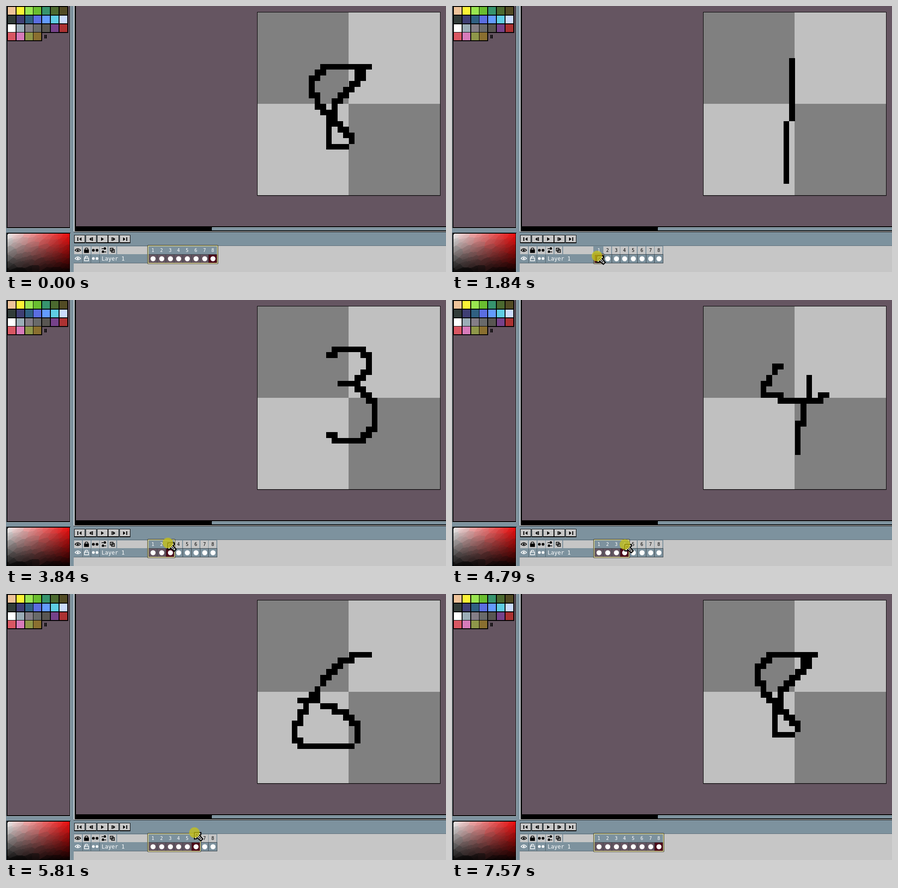
These frames come from a looping animation (962 by 582 pixels, 8 s). An HTML page with a canvas:

```html
<!DOCTYPE html>
<html lang="en">
<head>
<meta charset="utf-8">
<title>Pixel editor timeline</title>
<style>
  html, body { margin: 0; width: 100%; height: 100%; overflow: hidden; background: #7d929e; }
  svg { position: absolute; left: 0; top: 0; display: block; }
  #picker { position: absolute; left: 3px; top: 498px; }
  text { font-family: "DejaVu Sans Mono", monospace; white-space: pre; }
  .num { font-size: 10px; text-anchor: middle; }
</style>
</head>
<body>
<svg id="stage" width="962" height="582" viewBox="0 0 962 582"></svg>
<canvas id="picker" width="136" height="84"></canvas>
<script>
const NS = 'http://www.w3.org/2000/svg';
const stage = document.getElementById('stage');
const STEEL = '#7d929e', PLUM = '#655561', GRAY = '#c6c6c6', INK = '#000', WHITE = '#fff';
const LOOP = 8000, COL = 18.75, LEFT = 312;

function add(tag, attrs, parent = stage) {
  const el = document.createElementNS(NS, tag);
  for (const k in attrs) el.setAttribute(k, attrs[k]);
  return parent.appendChild(el);
}
const box = (x, y, width, height, fill, parent) =>
  add('rect', { x, y, width, height, fill, 'shape-rendering': 'crispEdges' }, parent);
const path = (d, attrs, parent) => add('path', { d, ...attrs }, parent);
const label = (x, y, str, attrs) => {
  const el = add('text', { x, y, ...attrs });
  el.textContent = str;
  return el;
};

// Palette panel
function drawPalette() {
  box(0, 0, 1, 486, '#b4c4cc');
  box(1, 0, 139, 486, INK);
  box(2, 486, 138, 1, '#b4c4cc');
  box(140, 0, 1, 486, '#b4c4cc');
  box(3, 0, 136, 484, PLUM);
  const rows = [
    'eec39a fbf236 99e550 6abe30 37946e 4b692f 524b24',
    '323c39 3f3f74 306082 5b6ee1 639bff 5fcde4 cbdbfc',
    'ffffff 9badb7 847e87 696a6a 595652 76428a ac3232',
    'd95763 d77bba 8f974a 8a6f30'
  ];
  box(3, 0, 132, 2, INK);
  rows.forEach((row, j) => row.split(' ').forEach((c, i) => {
    const x = Math.round(3 + i * COL), y = Math.round(1 + j * COL);
    box(x, y, 20, 20, INK);
    box(x + 1, y + 1, 17, 17, '#' + c);
  }));
  box(84, 63, 2, 8, INK);
  box(87, 63, 2, 8, INK);
  box(1, 496, 140, 86, INK);
  box(140, 497, 1, 85, '#b4c4cc');
}

// Saturation/value field broken into slanted patches
function drawPicker() {
  const W = 136, H = 84, ctx = document.getElementById('picker').getContext('2d');
  const img = ctx.createImageData(W, H), seeds = [];
  let s = 7;
  const rnd = () => (s = (s * 16807) % 2147483647) / 2147483647;
  for (let k = 0; k < 190; k++) seeds.push([rnd() * 150 - 7, rnd() * 96 - 6]);
  for (let y = 0; y < H; y++) for (let x = 0; x < W; x++) {
    let best = 1e9, hit;
    for (const p of seeds) {
      const dx = x - p[0], dy = y - p[1];
      const along = (dx - dy * .6) * .55, across = dx * .6 + dy;
      const d = along * along + across * across;
      if (d < best) { best = d; hit = p; }
    }
    const u = Math.min(1, Math.max(0, (hit[0] * .6 + x * .4) / W));
    const v = Math.min(1, Math.max(0, 1 - (hit[1] * .6 + y * .4) / 86));
    const hi = 238 * v, lo = hi * (1 - u * .96);
    img.data.set([hi, lo, lo, 255], (y * W + x) * 4);
  }
  ctx.putImageData(img, 0, 0);
  ctx.fillStyle = INK;
  ctx.fillRect(0, 0, 2, 1);
  ctx.fillRect(0, 0, 1, 2);
}

// Drawing area with checkerboard
function drawEditor() {
  box(148, 0, 2, 495, '#dfe6ea');
  box(150, 0, 812, 494, INK);
  box(153, 0, 809, 482, PLUM);
  box(450, 484, 512, 7, STEEL);
  box(451, 484, 511, 1, '#a9bac4');
  box(150, 493, 812, 1, WHITE);
  box(148, 494, 814, 1, INK);
  box(549, 13, 401, 402, INK);
  box(549, 415, 401, 1, '#4a3f47');
  box(550, 14, 399, 400, '#c0c0c0');
  box(550, 14, 199, 200, '#808080');
  box(749, 214, 200, 200, '#808080');
}

function drawTransport() {
  const icons = ['M-5-4h2v8h-2zM4-4v8l-5-4z', 'M1-4v8l-5-4zM2-4h2v8h-2z', 'M-3-4v8l6-4z',
    'M-4-4h2v8h-2zM-1-4v8l5-4z', 'M-4-4v8l5-4zM3-4h2v8h-2z'];
  icons.forEach((d, i) => {
    const x = Math.round(149 + i * 24.8);
    box(x, 501, 24, 18, INK);
    box(x + 1, 502, 22, 15, GRAY);
    box(x + 1, 502, 22, 1, WHITE);
    path(d, { transform: `translate(${x + 12} 510)`, fill: INK });
  });
}

function rowIcons(y, color) {
  const at = x => add('g', { transform: `translate(${x} ${y})`, fill: 'none', stroke: color, 'stroke-width': 1.5 });
  const eye = at(157);
  path('M-6 0Q0-7 6 0Q0 6-6 0z', {}, eye);
  add('circle', { r: 2, fill: color, stroke: 'none' }, eye);
  const lock = at(176);
  path(color === INK ? 'M-3 0v-3q0-2 3-2t3 2v3' : 'M-3 0v-3q0-2 3-2t3 2', {}, lock);
  path('M-4.5-1h9v6h-9z', color === INK ? { fill: color } : {}, lock);
  const dots = at(195);
  for (const x of [-4, 4]) add('circle', { cx: x, r: 3, fill: color, stroke: 'none' }, dots);
}

function drawLayers() {
  box(148, 524, 163, 39, STEEL);
  box(311, 524, 651, 58, GRAY);
  box(148, 563, 814, 19, GRAY);
  box(148, 524, 814, 1, '#5f707a');
  for (let i = 0; i < 5; i++) box(Math.round(149 + i * COL), 526, 17, 17, GRAY);
  box(243, 526, 66, 17, GRAY);
  rowIcons(534.5, INK);
  rowIcons(552.5, WHITE);
  path('M209 531h10M209 538h10', { stroke: INK, 'stroke-width': 1.5 });
  path('M214 528h4v5h-4zM210 535h4v5h-4z', { fill: INK });
  path('M228 530h6v6h-6zM231 533h6v6h-6z', { fill: GRAY, stroke: INK, 'stroke-width': 1.5 });
  for (const x of [167, 185, 204]) box(x, 544, 1, 18, '#56656e');
  box(148, 562, 314, 1, '#56656e');
  label(209, 557, 'Layer 1', { fill: WHITE, 'font-size': 12 });
}

drawPalette();
drawPicker();
drawEditor();
drawTransport();
drawLayers();

// Hand-drawn numerals on a 32 x 32 grid; each cell is 12.5 px
const numerals = [
  'M15 8v10M14 19v10',
  'M11 13v-3h1v-1h1v-1h5v1h1v4h-1v2h-1v2h-1v2h-1v2h-1v2h-1v2h-1v1h13',
  'M12 8h1v-1h5v1h1v3h-1v1h-1v1h-3M17 14h1v1h1v1h1v5h-1v1h-1v1h-5v-1h-1',
  'M13 10h-1v1M11 12v1h-1v2h3v1h7v-1h1M18 12v4M17 17v3h-1v5',
  'M21 8h-9v8h5v1h2v1h1v6h-1v1h-1v1h-6v-1h-1',
  'M19 9h-3v1h-2v1h-1v1h-1v1h-1v1M10 15v2h-3M9 16h1M8 17v2h-1v2h-1v3h1v1h9M11 18h2v1h2v1h1v1h1v3',
  'M11 9h9v2h-1v2h-1v2h-1v3h-1v2M15 21v3h-1v4h-1v1',
  'M11 9h8M11 10h-1v1h-1v3h1v2h1v1h2M12 17v6h3M17 10h1v1h-1v1h-1v1h-1v1h-1v1h-1v4h1v1h1v1h1v1'
];
const sketch = path('', {
  transform: 'translate(549.5 14) scale(12.5) translate(.5 .5)', fill: 'none', stroke: INK,
  'stroke-width': 1, 'stroke-linecap': 'square', 'shape-rendering': 'crispEdges'
});

const columns = numerals.map((_, i) => {
  const x = Math.round(LEFT + i * COL);
  box(x - 1, 525, 20, 19, STEEL);
  box(x - 1, 543, 20, 20, '#3c474e');
  const head = box(x, 526, 17, 17, GRAY);
  const cell = box(x, 544, 18, 18, STEEL);
  const num = label(x + 9, 538, i + 1, { class: 'num' });
  add('circle', { cx: x + 9.5, cy: 553, r: 5.5, fill: WHITE });
  return { head, cell, num };
});

const outer = add('rect', { fill: 'none', stroke: '#2c2a22', rx: 1 });
const inner = add('rect', { fill: 'none', stroke: '#e2db8e', 'stroke-width': 1.6, rx: 1 });
const pointer = add('g', {});
path('M0 0H14V4L11 6L18 14L14 18L6 11L4 14H0z',
  { fill: WHITE, stroke: INK, 'stroke-width': 2.4, 'stroke-linejoin': 'miter' }, pointer);
path('M3.5 10V3.5H10M5 5L14 14', { fill: 'none', stroke: INK, 'stroke-width': 1.6 }, pointer);
const halo = add('circle', { r: 11.5, fill: '#c8c314', 'fill-opacity': .75 }, pointer);

// time, x, y of the pointer tip
const track = [
  [1200, 352, 578], [1700, 317, 547], [2080, 317, 547], [2240, 320, 534],
  [2450, 320, 534], [2600, 316, 531], [2770, 320, 534], [3230, 320, 534],
  [3970, 361, 531], [4300, 361, 531], [4790, 378, 535], [5110, 394, 532],
  [5810, 412, 522], [5940, 416, 523], [6470, 430, 529], [6680, 431, 530],
  [7300, 445, 531], [7450, 445, 531], [7490, 428, 350], [7530, 402, 168], [7570, 402, 168]
];
const CLICK = 1800, CLICK_END = 1920, PRESS = 2990, RELEASE = 7450;

function tipAt(t) {
  const i = track.findIndex(k => k[0] > t);
  if (i < 1) return null;
  const a = track[i - 1], b = track[i], f = (t - a[0]) / (b[0] - a[0]);
  return [a[1] + (b[1] - a[1]) * f, a[2] + (b[2] - a[2]) * f];
}

function setRect(el, x, y, w, h) {
  el.setAttribute('x', x);
  el.setAttribute('y', y);
  el.setAttribute('width', w);
  el.setAttribute('height', h);
}

function render(t) {
  const tip = tipAt(t);
  let cur = 7;
  if (t >= CLICK && t < PRESS) cur = 0;
  else if (t >= PRESS && t < RELEASE) cur = Math.max(0, Math.min(7, Math.floor((tip[0] - LEFT) / COL)));

  sketch.setAttribute('d', numerals[cur]);
  columns.forEach((c, i) => {
    const on = i <= cur;
    c.head.setAttribute('fill', on ? STEEL : GRAY);
    c.num.setAttribute('fill', on ? WHITE : INK);
    c.cell.setAttribute('fill', i === cur ? '#4c0a1a' : on ? PLUM : STEEL);
  });

  const cellOnly = t >= CLICK && t < PRESS;
  const top = cellOnly ? 542 : 523.5, w = (cur + 1) * COL + 2;
  setRect(outer, 309.5, top, w + 2, 564 - top);
  setRect(inner, 310.7, top + 1.2, w - .4, 561.6 - top);
  inner.setAttribute('stroke', cur ? '#e2db8e' : '#a5a17c');

  pointer.setAttribute('visibility', tip ? 'visible' : 'hidden');
  if (tip) pointer.setAttribute('transform', `translate(${tip[0]} ${tip[1]})`);
  const pressed = (t >= CLICK && t < CLICK_END) || (t >= PRESS && t < RELEASE);
  halo.setAttribute('display', pressed ? 'inline' : 'none');
}

const start = performance.now();
function tick() {
  render((performance.now() - start) % LOOP);
  requestAnimationFrame(tick);
}
tick();
</script>
</body>
</html>
```
